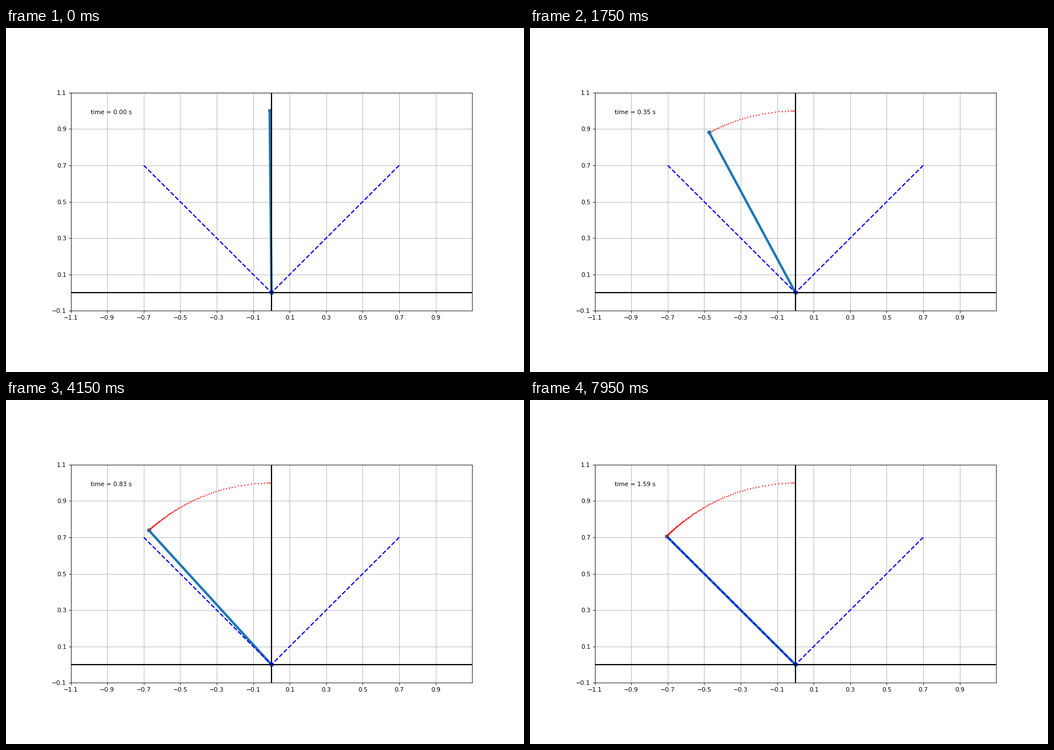
Animation, 917 px wide and 611 px high, one loop 8 s. Source, as a matplotlib script:

```python
import numpy as np
import matplotlib.pyplot as plt
from matplotlib.animation import FuncAnimation

WIDTH, HEIGHT, DPI = 917, 611, 76.4
FRAMES, INTERVAL, DT = 160, 50, 0.01
STOP = np.pi / 4

# Damped fall from rest near the top, halted by the 45 degree stop
START, LIMIT, SLOW, REACH = 0.01, 0.83, 2.71, 0.8706
KICK = START - LIMIT + REACH
FAST = SLOW * REACH / KICK

t = np.arange(FRAMES) * DT
theta = LIMIT - REACH * np.exp(-SLOW * t) + KICK * np.exp(-FAST * t)
theta = np.minimum(theta, STOP)
tip_x, tip_y = -np.sin(theta), np.cos(theta)

fig = plt.figure(figsize=((WIDTH + 1e-6) / DPI, (HEIGHT + 1e-6) / DPI), dpi=DPI)
ax = fig.add_subplot(111, aspect="equal", xlim=(-1.1, 1.1), ylim=(-0.1, 1.1))
ax.set_xticks(np.arange(-1.1, 1.0, 0.2))
ax.set_yticks(np.arange(-0.1, 1.15, 0.2))
ax.grid()

rod, = ax.plot([], [], "o-", lw=4)
trail, = ax.plot([], [], "r.", ms=2)
ax.axhline(0, color="black", lw=2)
ax.axvline(0, color="black", lw=2)
for side in (-0.7, 0.7):
    ax.plot([side, 0], [0.7, 0], "b--", lw=2)
label = ax.text(0.05, 0.9, "", transform=ax.transAxes)


def update(i):
    rod.set_data([0, tip_x[i]], [0, tip_y[i]])
    trail.set_data(tip_x[:i], tip_y[:i])
    label.set_text(f"time = {t[i]:.2f} s")
    return rod, trail, label


anim = FuncAnimation(fig, update, frames=FRAMES, interval=INTERVAL,
                     init_func=lambda: update(0), repeat=True, repeat_delay=0)
plt.show()
```
